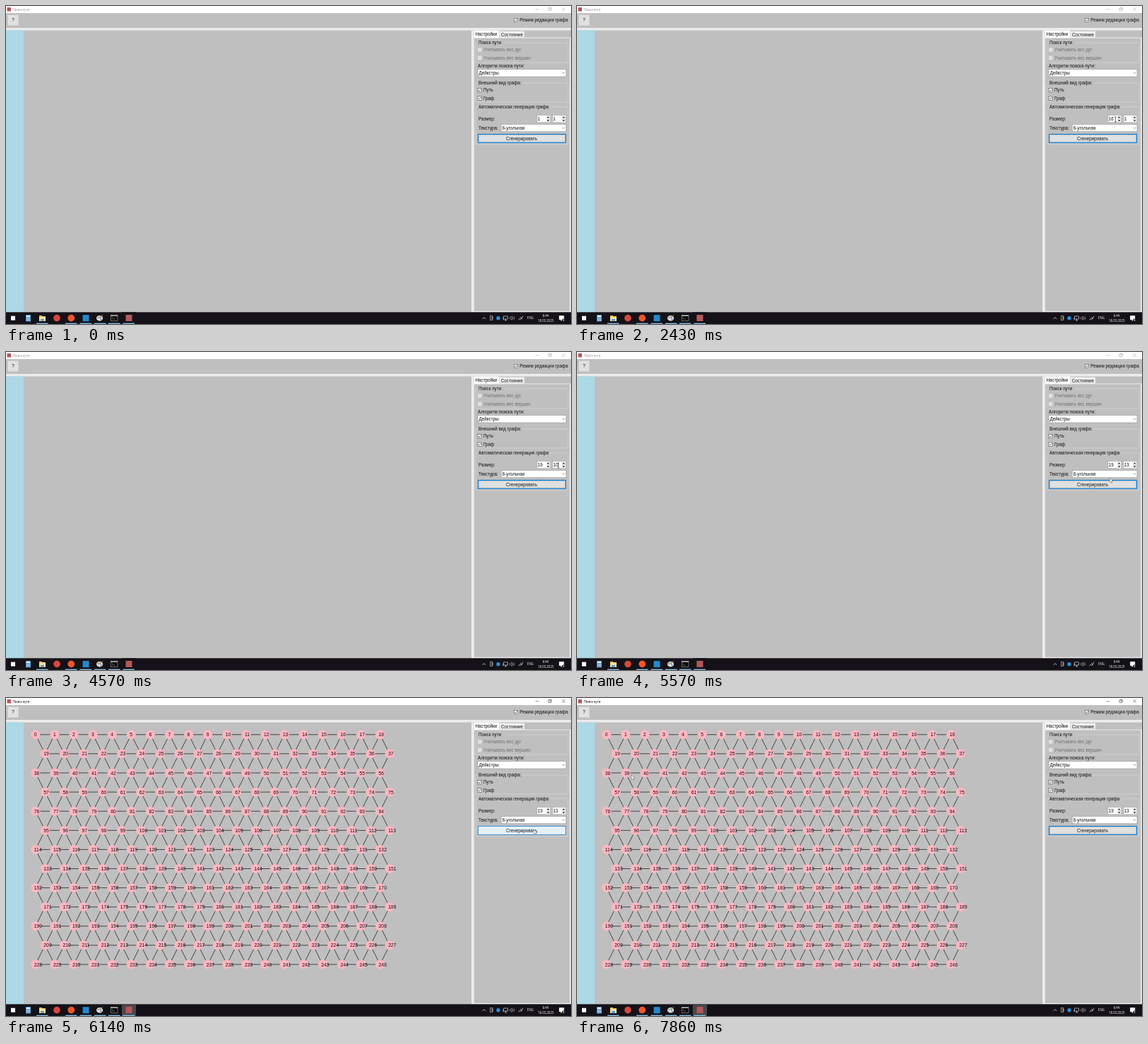
These frames come from a looping animation (800 by 450 pixels, 8000 ms). An HTML page:

```html
<!DOCTYPE html>
<html lang="ru">
<head>
<meta charset="utf-8">
<title>Поиск пути</title>
<style>
html, body { margin: 0; width: 100%; height: 100%; overflow: hidden; background: #bfbfbf; }
svg { display: block; width: 100%; height: 100%; }
text { font-family: "Liberation Sans", Arial, sans-serif; font-size: 6.3px; fill: #111; white-space: pre; }
.sys { font-family: "Open Sans", "Noto Sans", sans-serif; font-size: 4.4px; fill: #fff; text-anchor: middle; }
</style>
</head>
<body>
<svg id="stage" viewBox="0 0 800 450"></svg>
<script>
const NS = "http://www.w3.org/2000/svg";
const stage = document.getElementById("stage");

function el(tag, attrs, parent = stage) {
  const node = document.createElementNS(NS, tag);
  for (const k in attrs) node.setAttribute(k, attrs[k]);
  parent.appendChild(node);
  return node;
}
const rect = (x, y, w, h, fill, extra, parent) =>
  el("rect", { x, y, width: w, height: h, fill, ...extra }, parent);
const path = (d, stroke, width = 0.6, extra, parent) =>
  el("path", { d, fill: "none", stroke, "stroke-width": width, ...extra }, parent);
const dot = (cx, cy, r, fill, parent) => el("circle", { cx, cy, r, fill }, parent);
// y is the middle of the capitals
function label(x, y, str, extra, parent) {
  const t = el("text", { x, y: y + 2.2, ...extra }, parent);
  t.textContent = str;
  return t;
}
const show = (node, on) => node.setAttribute("visibility", on ? "visible" : "hidden");

function checkBox(x, y, str, on, enabled = true) {
  rect(x, y - 2.7, 5.4, 5.4, enabled ? "#fff" : "#e2e2e2",
    { stroke: enabled ? "#333" : "#d0d0d0", "stroke-width": 0.5 });
  if (on) path(`M${x + 1.2} ${y}l1.2 1.3 2-2.8`, "#222", 0.7);
  label(x + 8, y, str, enabled ? {} : { style: "fill:#707070" });
}
function group(y, h, str, w) {
  path(`M668 ${y}h-3v${h}h131v${-h}h${-(796 - 671 - w)}`, "#dadada", 0.6);
  label(669, y, str);
}
function combo(x, y, str) {
  rect(x, y, 793 - x, 10.4, "#fff", { stroke: "#858585", "stroke-width": 0.5 });
  path("M787.7 " + (y + 4.4) + "l1.7 1.7 1.7-1.7", "#444", 0.6);
  label(x + 1.5, y + 5.1, str);
}
function spinner(x) {
  rect(x, 154.5, 18.6, 10.3, "#fff", { stroke: "#888", "stroke-width": 0.4 });
  rect(x + 12.8, 154.9, 5.5, 4.6, "#ececec");
  rect(x + 12.8, 160, 5.5, 4.5, "#ececec");
  el("path", { d: `M${x + 14} 158.4h3.2l-1.6-2.2zM${x + 14} 161.2h3.2l-1.6 2.2z`, fill: "#222" });
  return label(x + 0.7, 159.6, "1");
}

// Window frame
rect(0, 0, 800, 450, "#bfbfbf");
rect(0, 0, 800, 10, "#fff");
rect(1.5, 2, 5.5, 5.5, "#b5585a");
const title = label(9.5, 4.5, "Поиск пути", { style: "font-size:4.7px" });
title.setAttribute("y", 6.5);
const winButtons = path("M749.5 4.7h4.5M768 3.2h3.3v3.3h-3.3zM769 3.2v-1h3.3v3.3h-1M787.3 2.3l4.4 4.4M791.7 2.3l-4.4 4.4", "#999", 0.5);
rect(2.5, 12.5, 15, 15, "#e1e1e1", { stroke: "#cfcfcf", "stroke-width": 0.5 });
label(10, 20, "?", { "text-anchor": "middle" });
checkBox(719.3, 20, "Режим редакции графа", true);
rect(0, 31, 800, 3.5, "#ececec");
rect(0, 34.5, 25, 399, "#add8e6");
rect(659, 34.5, 3.8, 399, "#ececec");
rect(662, 44.6, 138, 0.9, "#f2f2f2");
rect(798, 45, 2, 388, "#e4e4e4");
rect(662, 431.8, 138, 1.4, "#ececec");

// Settings panel
rect(663, 34.5, 35.5, 10.6, "#fbfbfb");
rect(699, 35.8, 35, 9, "#f0f0f0", { stroke: "#d8d8d8", "stroke-width": 0.4 });
label(664.5, 39.6, "Настройки");
label(700.7, 40.4, "Состояние");
group(52, 28, "Поиск пути", 35);
checkBox(668, 62, "Учитывать вес дуг", false, false);
checkBox(668, 73.5, "Учитывать вес вершин", false, false);
label(668, 84.6, "Алгоритм поиска пути:");
combo(668, 89.6, "Дейкстры");
group(109, 27, "Внешний вид графа:", 60);
checkBox(668, 119.2, "Путь", true);
checkBox(668, 130.7, "Граф", true);
group(142.7, 53, "Автоматическая генерация графа", 100);
label(669, 159.6, "Размер:");
const cols = spinner(752), rows = spinner(774);
label(669, 172.6, "Текстура:");
combo(701.2, 167.4, "6-угольная");
const button = rect(668.5, 181.5, 124, 11.8, "#e1e1e1", { stroke: "#0078d7" });
const focus = rect(669.8, 182.8, 121.4, 9.2, "none",
  { stroke: "#333", "stroke-width": 0.35, "stroke-dasharray": "0.5 0.7" });
label(730, 187.4, "Сгенерировать", { "text-anchor": "middle" });

// Graph of triangles: 13 rows of 19 nodes, odd rows shifted by half a step
const graph = el("g", {});
(function buildGraph(w, h, step) {
  const px = (c, r) => 41.8 + step * (c + (r % 2) / 2);
  const py = r => 51.8 + step * r;
  let edges = "";
  const join = (c, r, c2, r2) => {
    if (c2 >= 0 && c2 < w && r2 < h)
      edges += `M${px(c, r).toFixed(1)} ${py(r).toFixed(1)}L${px(c2, r2).toFixed(1)} ${py(r2).toFixed(1)}`;
  };
  const each = fn => { for (let i = 0; i < w * h; i++) fn(i % w, Math.floor(i / w), i); };
  each((c, r) => {
    join(c, r, c + 1, r);
    join(c, r, c, r + 1);
    join(c, r, r % 2 ? c + 1 : c - 1, r + 1);
  });
  path(edges, "#1c1c1c", 0.75, {}, graph);
  each((c, r) => dot(px(c, r), py(r), 6.6, "#ffb6c1", graph));
  each((c, r, i) => label(px(c, r) - 2, py(r) + 0.3, i, { style: "font-size:6.8px" }, graph));
})(19, 13, 27.1);

// Taskbar
rect(0, 433.3, 800, 16.7, "#141218");
const appTile = rect(164, 433.3, 20, 16.7, "#141218");
rect(7, 438.7, 6, 6, "#fff");
rect(28, 437, 7, 9.5, "#5b9bd0");
rect(29, 438, 5, 2, "#e8f2fa");
path("M29.3 442h4.6M29.3 444.2h4.6", "#e8f2fa", 1, { "stroke-dasharray": "1.1 0.65" });
el("path", { d: "M47 438h3.5l1 1h4.5v7h-9z", fill: "#f2c55c" });
rect(47, 440, 9, 5.6, "#fbe29a");
rect(49, 443, 5, 2.6, "#4a9bd8");
dot(72, 441.6, 4.8, "#d9483b");
dot(92.3, 441.6, 4.9, "#f2552c");
rect(108.6, 437.2, 9, 9, "#2489ca");
el("ellipse", { cx: 132.6, cy: 441.8, rx: 4.6, ry: 3.9, fill: "#d8dde0" });
dot(130.5, 441, 0.9, "#d2553e");
dot(133, 440, 0.9, "#4c9a4f");
dot(134.4, 443, 0.9, "#3f77c2");
path("M133 442l4-5", "#b9863d", 0.9);
rect(148.5, 437.6, 9.4, 8, "#050505", { stroke: "#a8a8a8", "stroke-width": 0.6 });
path("M148.5 438.3h9.4", "#ddd", 1);
path("M150 440.7l1.3 1-1.3 1M152 443.2h2", "#eee", 0.5);
rect(169.5, 437, 9, 9, "#b5585a");
for (const x of [43, 84, 104.5, 125, 145, 165.5]) rect(x, 448.7, 16.5, 1.3, "#86bfe8");

// Tray
path("M674.7 443l2.3-2.4 2.3 2.4", "#eee", 0.7);
path("M685.5 438.5h3.2v6h-3.2zM687 440.5h3M687 442.5h3", "#ddd", 0.6);
dot(697, 441.7, 2.7, "#2b8fe0");
path("M704.5 439h6v4h-6zM706 445h3.2M707.5 443v2M704 441v3.5", "#eee", 0.6);
path("M713.4 440.6h1.3l1.7-1.7v5.6l-1.7-1.7h-1.3zM717.6 440.3q1 1.4 0 2.8M719 439.2q1.8 2.5 0 5", "#ddd", 0.5);
path("M725.7 444.3q1.5-3 2.4-1.4t2-.8l2-3.4M728 440l3 2.6", "#eee", 0.7);
const sys = (x, y, str) => {
  const t = el("text", { x, y, class: "sys" });
  t.textContent = str;
};
sys(742.6, 443.3, "ENG");
sys(764, 439.7, "6:44");
sys(764.2, 446.9, "18.03.2025");
path("M783.5 438.5h6.3v5.2h-2.2l-1.6 1.8v-1.8h-2.5z", "#fff", 0.7, { fill: "#fff" });
dot(789.3, 444.6, 2.1, "#333");
path("M789.4 443.3v2.6", "#fff", 0.6);

// Pointers
const arrow = el("path", { d: "M0 0v6.4l1.5-1.3 1 2.3 1.1-.5-1-2.2h2z", fill: "#fff", stroke: "#333", "stroke-width": 0.4 });
const beam = path("M-1.2-3.5h2.4M0-3.5v7M-1.2 3.5h2.4", "#111", 0.6);

// Pointer track: [tick, x, y, isBeam]; held until the next entry
const track = [
  [1, 28, 440], [2, 60, 330], [3, 180, 180], [4, 330, 80], [5, 500, 42], [6, 640, 85],
  [7, 735, 140], [8, 763.5, 160.4, 1], [10, 762.4, 160.4, 1],
  [24, 768, 159.5], [25, 773, 159.5], [27, 781.2, 160.4, 1], [28, 782, 160.4, 1],
  [38, 769, 169], [39, 754.3, 178], [40, 750, 182], [41, 748, 185], [42, 747.3, 186],
  [46, 735, 200], [47, 640, 285], [48, 520, 343], [49, 380, 300], [50, 240, 215],
  [51, 130, 135], [52, 60, 81], [53, 28, 89], [54, 48, 97], [55, 77, 109]
];
// Each wheel notch adds three
const notches = (ticks, tick) => 1 + 3 * ticks.filter(n => n <= tick).length;
const colTicks = [13, 14, 15, 16, 17, 22], rowTicks = [29, 30, 32, 36];

function draw(ms) {
  const tick = Math.floor((ms + 4) * 7 / 1000);
  const active = tick >= 42;

  cols.textContent = notches(colTicks, tick);
  rows.textContent = notches(rowTicks, tick);
  title.style.fill = active ? "#111" : "#999";
  winButtons.setAttribute("stroke", active ? "#222" : "#999");
  appTile.setAttribute("fill", tick >= 43 ? "#4a474c" : active ? "#302d34" : "#141218");
  show(graph, tick >= 43);

  const hover = tick >= 40 && tick < 46;
  button.setAttribute("fill", !hover ? "#e1e1e1" : tick === 42 ? "#d0e5f5" : "#e5f1fb");
  button.setAttribute("stroke-width", hover ? 0.7 : 1.1);
  show(focus, tick < 43 || tick >= 46);

  const at = track.filter(p => p[0] <= tick).pop();
  show(arrow, at && !at[3]);
  show(beam, at && at[3]);
  if (at) (at[3] ? beam : arrow).setAttribute("transform", `translate(${at[1]} ${at[2]})`);
}

const start = performance.now();
function loop() {
  draw((performance.now() - start) % 8000);
  requestAnimationFrame(loop);
}
loop();
</script>
</body>
</html>
```
